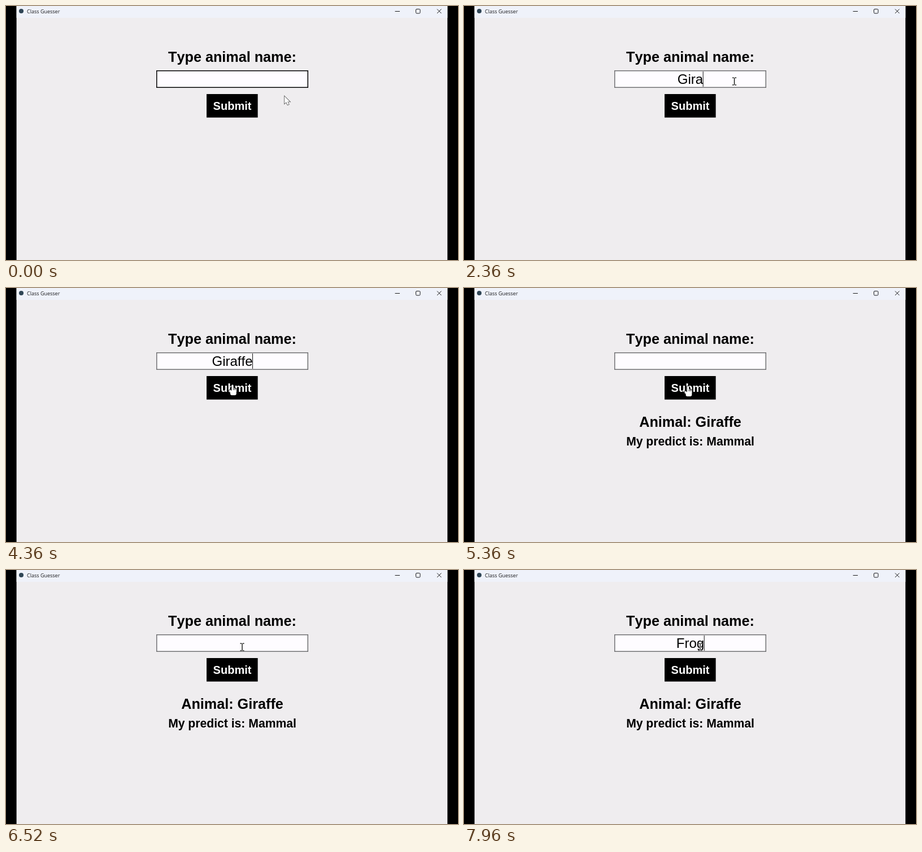
Animation of 800 by 450 pixels, one loop 8 s. Source, as an HTML page with a canvas:

```html
<!DOCTYPE html>
<html lang="en">
<head>
<meta charset="utf-8">
<title>Class Guesser</title>
<style>
html, body { margin: 0; width: 100%; height: 100%; overflow: hidden; background: #000; }
canvas { display: block; width: 800px; height: 450px; }
</style>
</head>
<body>
<canvas id="stage" width="800" height="450"></canvas>
<script>
const ctx = document.getElementById("stage").getContext("2d");
const LOOP = 8000;
const MID = 400.5;
const KEY_MS = 213;
const INK = "#1b1b1d";
const SANS = '"Liberation Sans", Arial, sans-serif';
const ENTRY = { x: 266, y: 114, w: 269, h: 31 };
const BUTTON = { x: 355, y: 156, w: 90.6, h: 41.6 };
const FOCUS_AT = 400, SUBMIT_AT = 4680, REFOCUS_AT = 6840;

const REST = { x: 493, y: 160 };
const MOVES = [
  { from: 0, to: 440, x: 478.5, y: 133.5 },
  { from: 3880, to: 4440, x: 396.5, y: 173.5 },
  { from: 5880, to: 6520, x: 418, y: 136.5 }
];

const clamp = (v, lo, hi) => Math.max(lo, Math.min(hi, v));
const ease = p => p * p * (3 - 2 * p);
const inside = (r, x, y) => x >= r.x && x < r.x + r.w && y >= r.y && y < r.y + r.h;

function pointerAt(t) {
  let { x, y } = REST;
  for (const m of MOVES) {
    const k = ease(clamp((t - m.from) / (m.to - m.from), 0, 1));
    x += (m.x - x) * k;
    y += (m.y - y) * k;
  }
  return { x, y };
}

function typedAt(t) {
  const [word, start] = t < SUBMIT_AT ? ["Giraffe", 1680] : ["Frog", 7040];
  const count = Math.floor((t - start) / KEY_MS) + 1;
  return word.slice(0, clamp(count, 0, word.length));
}

function box(r, color, inset = 0) {
  ctx.fillStyle = color;
  ctx.fillRect(r.x + inset, r.y + inset, r.w - 2 * inset, r.h - 2 * inset);
}

function label(text, y, font, color = "#000", x = MID, align = "center") {
  ctx.font = font;
  ctx.fontKerning = "none";
  ctx.textAlign = align;
  ctx.fillStyle = color;
  ctx.fillText(text, x, y);
}

function line(x1, y1, x2, y2) {
  ctx.moveTo(x1, y1);
  ctx.lineTo(x2, y2);
}

function outlined(color, width) {
  ctx.strokeStyle = color;
  ctx.lineWidth = width;
  ctx.stroke();
  ctx.fillStyle = "#fff";
  ctx.fill();
}

function drawWindow() {
  box({ x: 0, y: 0, w: 800, h: 450 }, "#000");
  box({ x: 18.6, y: 0, w: 762.7, h: 450 }, "#efedef");
  box({ x: 18.6, y: 0, w: 762.7, h: 21 }, "#eff2fa");
  ctx.fillStyle = "#2f4656";
  ctx.beginPath();
  ctx.arc(27, 9, 4, 0, Math.PI * 2);
  ctx.fill();
  label("Class Guesser", 13, '9px "Open Sans", "Noto Sans", sans-serif', INK, 37, "left");

  ctx.strokeStyle = INK;
  ctx.lineWidth = 1;
  ctx.beginPath();
  line(688.5, 9.5, 697, 9.5);
  ctx.roundRect(725.5, 5.5, 7.5, 7.5, 1.5);
  line(763, 5.5, 770.5, 13);
  line(770.5, 5.5, 763, 13);
  ctx.stroke();
}

function drawEntry(t) {
  const typed = typedAt(t);
  const focused = t >= FOCUS_AT;
  box(ENTRY, focused ? "#707072" : "#000");
  box(ENTRY, "#fefcff", 1.5);
  label(typed, 138, "24px " + SANS);
  if (focused && (t < SUBMIT_AT || t >= REFOCUS_AT)) {
    const x = MID + ctx.measureText(typed).width / 2;
    box({ x: x - 0.5, y: 116, w: 1, h: 27 }, "#111");
  }
}

function drawArrow() {
  ctx.beginPath();
  ctx.moveTo(0, 0);
  ctx.lineTo(9.4, 9.5);
  ctx.lineTo(5.3, 9.5);
  ctx.lineTo(7.6, 14.3);
  ctx.lineTo(5.4, 15.3);
  ctx.lineTo(3, 10.3);
  ctx.lineTo(0, 13);
  ctx.closePath();
  outlined("#555", 1.6);
}

// Inverts whatever lies below it
function drawBeam() {
  ctx.globalCompositeOperation = "difference";
  ctx.strokeStyle = "#fff";
  ctx.lineWidth = 1.3;
  ctx.beginPath();
  line(0, -6, 0, 6);
  for (const y of [-6.3, 6.3]) {
    line(-3.6, y, -0.7, y);
    line(0.7, y, 3.6, y);
  }
  ctx.stroke();
}

function drawHand() {
  ctx.beginPath();
  ctx.roundRect(-1.6, 0, 3.2, 12, 1.6);
  for (let i = 1; i < 4; i++) ctx.roundRect(-1.6 + i * 2, 5 + i * 0.6, 2.6, 7, 1.3);
  ctx.roundRect(-6, 9, 3.2, 4.5, 1.5);
  ctx.roundRect(-4, 10, 10.8, 8.6, 3);
  outlined("#000", 1.6);
  ctx.lineWidth = 0.7;
  ctx.beginPath();
  for (let i = 0; i < 3; i++) line(1.5 + i * 1.8, 6, 1.5 + i * 1.8, 9.5);
  ctx.stroke();
}

function drawPointer(t) {
  const { x, y } = pointerAt(t);
  ctx.save();
  ctx.translate(x, y);
  if (inside(ENTRY, x, y)) drawBeam();
  else if (inside(BUTTON, x, y)) drawHand();
  else drawArrow();
  ctx.restore();
}

function draw(t) {
  drawWindow();
  label("Type animal name:", 99, "bold 25.2px " + SANS);
  drawEntry(t);
  box(BUTTON, "#000");
  label("Submit", 183.7, "bold 20px " + SANS, "#fff");
  if (t >= SUBMIT_AT) {
    label("Animal: Giraffe", 246, "bold 25.2px " + SANS);
    label("My predict is: Mammal", 279, "bold 21.15px " + SANS);
  }
  drawPointer(t);
}

const began = performance.now();
function tick() {
  draw((performance.now() - began) % LOOP);
  requestAnimationFrame(tick);
}
tick();
</script>
</body>
</html>
```
